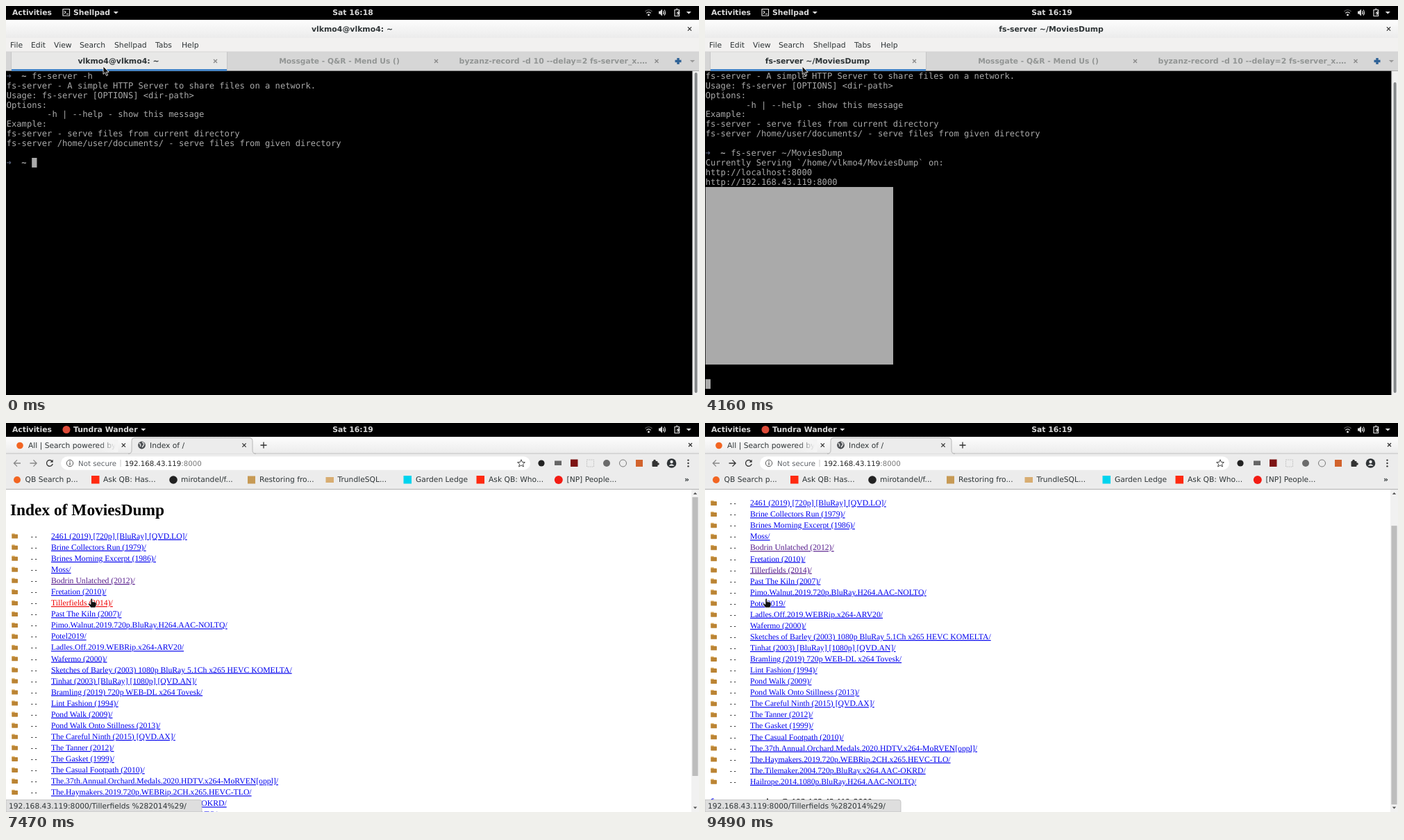
An HTML page for the animation above (9.57 s loop, 998x561 px).

```html
<!DOCTYPE html>
<html lang="en">
<head>
<meta charset="utf-8">
<title>fs-server demo</title>
<style>
html, body { margin: 0; width: 100%; height: 100%; overflow: hidden; background: #000; }
svg { display: block; }
text { white-space: pre; text-rendering: geometricPrecision; font-family: "DejaVu Sans", sans-serif; font-size: 10.7px; fill: #2e3436; }
.b { font-weight: bold; }
.bar { font-weight: bold; fill: #d9d9d9; font-size: 10.8px; }
.mono { font-family: "DejaVu Sans Mono", monospace; font-size: 12.136px; fill: #aaa; }
.url { font-size: 10.23px; fill: #222; }
.link { font-family: "Liberation Serif", serif; font-size: 11.69px; fill: #00e; text-decoration: underline; }
.h1 { font: bold 23.38px "Liberation Serif", serif; fill: #000; }
.h3 { font: italic bold 13.68px "Liberation Serif", serif; fill: #000; }
.dash { font: 9.5px "DejaVu Sans Mono", monospace; fill: #000; }
.line { fill: none; stroke: #333; stroke-width: 1.3; }
</style>
</head>
<body>
<svg id="stage" width="998" height="561" viewBox="0 0 998 561"></svg>
<script>
const LOOP = 9570, ROW = 13.88, CHAR = 7.306, LINE = 16.065;
const COMMAND = 'fs-server ~/MoviesDump/';
const HOST = '192.168.43.119';

const USAGE = [
  'fs-server - A simple HTTP Server to share files on a network.',
  'Usage: fs-server [OPTIONS] &lt;dir-path&gt;',
  'Options:',
  '        -h | --help - show this message',
  'Example:',
  'fs-server - serve files from current directory',
  'fs-server /home/user/documents/ - serve files from given directory'
];

const FOLDERS = [
  '2461 (2019) [720p] [BluRay] [QVD.LO]',
  'Brine Collectors Run (1979)',
  'Brines Morning Excerpt (1986)',
  'Moss',
  'Bodrin Unlatched (2012)',
  'Fretation (2010)',
  'Tillerfields (2014)',
  'Past The Kiln (2007)',
  'Pimo.Walnut.2019.720p.BluRay.H264.AAC-NOLTQ',
  'Potel2019',
  'Ladles.Off.2019.WEBRip.x264-ARV20',
  'Wafermo (2000)',
  'Sketches of Barley (2003) 1080p BluRay 5.1Ch x265 HEVC KOMELTA',
  'Tinhat (2003) [BluRay] [1080p] [QVD.AN]',
  'Bramling (2019) 720p WEB-DL x264 Tovesk',
  'Lint Fashion (1994)',
  'Pond Walk (2009)',
  'Pond Walk Onto Stillness (2013)',
  'The Careful Ninth (2015) [QVD.AX]',
  'The Tanner (2012)',
  'The Gasket (1999)',
  'The Casual Footpath (2010)',
  'The.37th.Annual.Orchard.Medals.2020.HDTV.x264-MoRVEN[oppl]',
  'The.Haymakers.2019.720p.WEBRip.2CH.x265.HEVC-TLO',
  'The.Tilemaker.2004.720p.BluRay.x264.AAC-OKRD',
  'Hailrope.2014.1080p.BluRay.H264.AAC-NOLTQ'
];
const CHOSEN = 6, VISITED = 4;

// markup helpers
const text = (x, y, s, cls = '', more = '') => `<text x="${x}" y="${y}" class="${cls}" ${more}>${s}</text>`;
const mid = (x, y, s, cls, more = '') => text(x, y, s, cls, 'text-anchor="middle" ' + more);
const rect = (x, y, w, h, fill, more = '') => `<rect x="${x}" y="${y}" width="${w}" height="${h}" fill="${fill}" ${more}/>`;
const dot = (x, y, r, fill, more = '') => `<circle cx="${x}" cy="${y}" r="${r}" fill="${fill}" ${more}/>`;
const path = (d, more = 'class="line"') => `<path d="${d}" ${more}/>`;
const group = (id, s, more = '') => `<g id="${id}" ${more}>${s}</g>`;
const cross = (x, y, r, color = '#333', w = 1.3) =>
  path(`M${x - r} ${y - r}l${2 * r} ${2 * r}m0 ${-2 * r}l${-2 * r} ${2 * r}`, `stroke="${color}" stroke-width="${w}" fill="none"`);
const caret = (x, y, fill, r = 3.6) => path(`M${x - r} ${y}h${2 * r}l${-r} ${r}z`, `fill="${fill}"`);
const rowY = i => 104.9 + ROW * i;

const gradient = (id, axis, stops) => `<linearGradient id="${id}" ${axis}>` +
  stops.map(([c, o], i) => `<stop offset="${i}" stop-color="${c}" stop-opacity="${o}"/>`).join('') + '</linearGradient>';

function topBar() {
  const ink = 'fill="none" stroke="#ddd" stroke-width="1.2"';
  return rect(0, 0, 998, 19.7, '#000') +
    text(9, 12.9, 'Activities', 'bar') +
    mid(499.5, 12.9, '', 'bar', 'id="clock"') +
    group('appShell',
      path('M82 4.5h9.5v9.5h-9.5zM84 7l2 2l-2 2M87 11.5h3', ink) +
      text(97, 12.9, 'Shellpad', 'bar') + caret(158.3, 8, '#ddd')) +
    group('appWeb', dot(87, 9.5, 5.5, '#dd4b39') +
      text(97, 12.9, 'Tundra Wander', 'bar') + caret(197.8, 8, '#ddd')) +
    path('M920.5 8a6.5 6.5 0 0 1 10 0', 'fill="none" stroke="#555" stroke-width="1.4"') +
    path('M922.3 10.3a4.3 4.3 0 0 1 6.4 0', ink) + dot(925.5, 12.8, 1.5, '#ddd') +
    path('M940 7.5h2l3-3v10l-3-3h-2z', 'fill="#ddd"') +
    path('M946.5 7q1.6 2.4 0 5M948 5.5q3 4 0 8', ink) +
    path('M963 5.5h6.5v9h-6.5zM965 4h2.5', ink) +
    path('M969 7l-4 3.5h2.5l-1 3.5l4.5-4.5h-2.5z', 'fill="#ddd"') +
    caret(983.3, 8, '#ddd');
}

function shell() {
  const menu = [[6, 'File'], [36, 'Edit'], [69, 'View'], [106, 'Search'], [156, 'Shellpad'], [215, 'Tabs'], [253, 'Help']];
  const prompt = (y, s, id) => text(0.5, y, '➜', 'mono', 'style="fill:#566079"') +
    text(22.3, y, '~', 'mono b') + text(37.2, y, s, 'mono', `id="${id}"`);
  return rect(0, 19.7, 998, 542, '#000') +
    group('lines',
      group('oldPrompt', prompt(rowY(0), 'fs-server -h', 'first')) +
      USAGE.map((s, i) => text(0.7, rowY(i + 1), s, 'mono')).join('') +
      prompt(rowY(9), '', 'typed') +
      group('serving', text(0.7, rowY(10), 'Currently Serving `/home/vlkmo4/MoviesDump` on:', 'mono') +
        text(0.7, rowY(11), 'http://localhost:8000', 'mono')) +
      text(0.7, rowY(12), `http://${HOST}:8000`, 'mono', 'id="address"') +
      rect(0.7, 274.9, 270.3, 256.1, '#aaa', 'id="panel"') +
      rect(0, 219, CHAR, 13.9, '#aaa', 'id="block"')) +
    rect(0, 19.7, 998, 26.8, 'url(#bar)') +
    mid(498.5, 36.6, '', 'b', 'id="title" style="font-size:10.9px"') +
    cross(984.5, 33, 2.6) +
    rect(0, 46, 998, 20, '#f2f1f0') + menu.map(m => text(m[0], 60, m[1], '', 'style="font-size:10.8px"')).join('') +
    rect(0, 66, 998, 27.6, '#d6d6d6') + rect(8, 66, 310, 27.6, '#e8e8e7') +
    rect(8, 91.2, 310, 2.4, '#2a76c6') +
    path('M7.5 66v27M318.5 66v27', 'stroke="#c6c6c6"') + rect(0, 65.6, 998, 0.8, '#cfcfcf') +
    mid(162, 83.3, '', 'b', 'id="tabName" style="font-size:10.9px"') +
    mid(480, 83.3, 'Mossgate - Q&amp;R - Mend Us ()', 'b', 'style="fill:#929594"') +
    mid(788, 83.3, 'byzanz-record -d 10 --delay=2 fs-server_x.…', 'b', 'style="fill:#929594;font-size:10.9px"') +
    [301.5, 619.5, 937].map(x => cross(x, 79.5, 2.5, '#888')).join('') +
    path('M968 75v9M963.5 79.5h9', 'stroke="#2f6296" stroke-width="3.4"') + caret(988.5, 78, '#999') +
    rect(988.6, 93.6, 9.4, 468, '#f1f1f0') + rect(988.6, 93.6, 0.7, 468, '#c8c8c8') +
    rect(991.6, 96, 4, 462, '#85888a', 'rx="2" id="slider"');
}

function entry(name, i, id) {
  const y = 166.8 + LINE * i;
  return rect(8.3, y - 7.5, 4.4, 2.6, '#e0b56c') + rect(8.3, y - 6.2, 8.7, 6, '#bb8433', 'rx=".6"') +
    text(34.5, y, '--', 'dash') +
    text(65, y, name, 'link', `id="${id}"`);
}

function pages() {
  const name = FOLDERS[CHOSEN];
  const endY = 166.8 + LINE * FOLDERS.length;
  const footer = y => text(7, y, `<tspan fill="#00e" text-decoration="underline">fs-server</tspan> running @ ${HOST}:8000`, 'h3');
  return rect(0, 96, 998, 465, '#fff') +
    group('index', text(6, 132.7, 'Index of MoviesDump', 'h1') +
      FOLDERS.map((s, i) => entry(s + '/', i, 'dir' + i)).join('') + footer(endY + 13.7)) +
    group('inner', text(6, 132.7, 'Index of MoviesDump/' + name, 'h1') +
      ['../', 'Tillerfields.2014.720p.mp4', 'Tillerfields.2014.720p.srt'].map((s, i) => entry(s, i, 'file' + i)).join('') +
      footer(230)) +
    group('scroll', rect(987, 96, 11, 465, '#f1f1f1') + rect(988.4, 107, 8.2, 402, '#bdbdbd', 'id="thumb"') +
      path('M989.8 103h5.4l-2.7-3z', 'fill="#555"') + path('M989.8 553.5h5.4l-2.7 3z', 'fill="#555"')) +
    group('status', path('M0 543.5h279q3 0 3 3V561H0z', 'fill="#dedede" stroke="#bbb" stroke-width=".8"') +
      text(4, 556, '', '', 'id="statusText"'));
}

function toolbar() {
  const marks = [
    ['QB Search p...', 27.5, dot(16, 82, 5, '#f26522')],
    ['Ask QB: Has...', 140, rect(123, 76, 11.5, 11.5, '#ff2a10')],
    ['mirotandel/f...', 252, dot(241, 82, 5.8, '#222')],
    ['Restoring fro...', 365, rect(348, 76.5, 11, 11, '#c79a55')],
    ['TrundleSQL...', 477.5, rect(460.5, 78, 11.5, 8, '#d8ad72')],
    ['Garden Ledge', 590, rect(572.5, 76, 11.5, 11.5, '#00d4ee')],
    ['Ask QB: Who...', 695, rect(677.5, 76, 11.5, 11.5, '#ff2a10')],
    ['[NP] People...', 807.5, dot(795.8, 82, 6, '#f31c14')]
  ];
  const arrow = (x, dir, id) => path(`M${x + 5 * dir} 58h${-9.5 * dir}m${4.5 * dir} -4.6l${-4.6 * dir} 4.6l${4.6 * dir} 4.6`, `class="line" id="${id}"`);
  return rect(0, 19.7, 998, 24.8, 'url(#bar)') +
    dot(20, 32.5, 4.8, '#f26522') + text(32, 35.6, 'All | Search powered by') +
    rect(134, 24, 24, 18, 'url(#fade)') + rect(157.5, 24, 4, 18, '#f4f4f4') +
    cross(169.3, 32, 2.6) + cross(985.5, 31.5, 2.5) +
    rect(0, 44, 998, 52, '#ececec') + rect(0, 43.6, 998, 0.8, '#b4b4b4') + rect(0, 95.2, 998, 0.9, '#a9a9a9') +
    path('', 'id="tab" fill="#ececec" stroke="#b0b0b0" stroke-width=".9"') +
    group('tabEnd', cross(-12, 32, 2.6) + path('M16 27.5v9M11.5 32h9', 'class="line"')) +
    group('globe', dot(195.5, 32, 5.4, '#4a4d51') +
      path('M192 29q3 3 1 5M196 28q4 1 2 4l-2 3', 'stroke="#ddd" stroke-width="1.5" fill="none"')) +
    path('M195.5 27a5 5 0 0 1 3 1', 'id="spin" class="line" stroke-width="1.1"') +
    text(207, 35.6, '', '', 'id="pageName"') +
    dot(16, 58, 9.6, '#d0d0d0', 'id="halo"') +
    arrow(16, 1, 'back') + arrow(39.5, -1, 'ahead') +
    group('stop', cross(63, 58, 4)) +
    group('reload', path('M66.4 55.2a4.4 4.4 0 1 0 .8 3.8', 'class="line"') + path('M67.6 52.8v4h-4z', 'fill="#333"')) +
    rect(79, 48.3, 676, 19.4, '#fff', 'rx="9.7"') +
    dot(92, 58, 4.7, 'none', 'stroke="#555"') + rect(91.4, 57.2, 1.3, 3.6, '#555') + rect(91.4, 55, 1.3, 1.3, '#555') +
    group('warn', text(104, 61.8, 'Not secure', 'url', 'style="fill:#5f6368"') + rect(164.6, 53, 0.8, 10, '#bbb')) +
    '<text id="url" y="61.8" class="url"><tspan id="host"></tspan><tspan id="rest" fill="#777"></tspan></text>' +
    path('M742 52.8l1.5 3.6l3.9.3l-3 2.5l1 3.8l-3.4-2.1l-3.4 2.1l1-3.8l-3-2.5l3.9-.3z', 'fill="none" stroke="#444" stroke-width="1"') +
    dot(771, 58, 4.6, '#222') + rect(790, 54.5, 10, 6.5, '#666') + rect(813, 52.5, 10.5, 10.5, '#7d1414') +
    rect(836.5, 53, 10, 10, 'none', 'stroke="#c4c4c4" stroke-dasharray="2 1"') +
    dot(865, 58, 5, '#6b6b6b') + dot(888.5, 58, 5, 'none', 'stroke="#777"') +
    rect(907, 53, 10, 10, '#d2632d') +
    rect(930.5, 55, 8, 8, '#333', 'rx="1"') + dot(934, 54.6, 1.8, '#333') + dot(939, 59, 1.8, '#333') +
    dot(958.5, 58, 6.8, '#2f3336') + dot(958.5, 56, 2.2, '#ececec') + path('M954.3 61.8q4.2-5 8.4 0z', 'fill="#ececec"') +
    [53.6, 58, 62.4].map(y => dot(982.5, y, 1.2, '#333')).join('') +
    marks.map(([s, x, icon]) => icon + text(x, 85.4, s)).join('') +
    text(977, 85, '»', 'b') +
    group('tip', rect(21, 69, 203, 17, '#f7f7f7', 'stroke="#aaa" stroke-width=".8"') +
      text(25, 81, 'Click to go back, hold to see history', '', 'style="font-size:10.2px"'));
}

const stage = document.getElementById('stage');
stage.innerHTML = '<defs>' +
  gradient('bar', 'x2="0" y2="1"', [['#fdfdfd', 1], ['#ebebeb', 1]]) +
  gradient('fade', '', [['#f4f4f4', 0], ['#f4f4f4', 1]]) + '</defs>' +
  group('shell', shell()) + group('web', pages() + toolbar()) + topBar() +
  group('mouse',
    path('M0 0v11.4l2.6-2.4l2 4.6l2-.9l-2-4.4h3.6z', 'id="arrow" fill="#111" stroke="#fff" stroke-width=".8"') +
    path('M-1 .8q1.2-1.6 2.3 0v4q4.5-.3 5.7 1.6v3.6l-1.6 3.2h-6.2l-4-5.2q.4-1.8 2.2-.4l1.6 1z', 'id="hand" fill="#111" stroke="#fff" stroke-width=".6"'));

const el = {};
stage.querySelectorAll('[id]').forEach(e => el[e.id] = e);

// timing tables: [ms, value...]
const TYPED = [[0, 0], [250, 1], [310, 2], [420, 3], [940, 4], [1020, 5], [1110, 6], [1280, 7], [1360, 8], [1440, 9], [1520, 10],
  [1700, 11], [1800, 12], [2400, 11], [2610, 12], [2870, 13], [3110, 14], [3290, 15], [3440, 23], [3800, 22]];
const MOUSE = [[0, 140, 87], [4160, 140, 87], [4500, 186, 160], [4910, 131, 252], [6520, 131, 252], [6760, 127, 234],
  [7010, 123, 253], [7760, 123, 253], [8350, 16, 57], [8850, 16, 57], [9040, 84, 214], [9220, 88, 253]];
const TAB = [[5830, 20], [5880, 44], [6080, 174]];
const SCROLL = [[9320, 0], [9490, 47.6]];

const step = (table, t) => table.reduce((v, s) => t >= s[0] ? s[1] : v, table[0][1]);
function tween(table, t, k = 1) {
  const i = table.findIndex(s => s[0] > t);
  if (i < 0) return table[table.length - 1][k];
  if (!i) return table[0][k];
  const a = table[i - 1], b = table[i];
  return a[k] + (b[k] - a[k]) * (t - a[0]) / (b[0] - a[0]);
}
const within = (t, a, b) => t >= a && t < b;
const show = (id, on) => el[id].style.display = on ? '' : 'none';
const put = (id, s) => { if (el[id].textContent !== s) el[id].textContent = s; };
const set = (id, name, v) => el[id].setAttribute(name, v);

function drawShell(t) {
  const running = t >= 3800, full = t >= 3880;
  const name = running ? 'fs-server ~/MoviesDump' : 'vlkmo4@vlkmo4: ~';
  const n = step(TYPED, t);
  put('title', name);
  put('tabName', name);
  put('typed', COMMAND.slice(0, n));
  show('oldPrompt', !full);
  show('serving', running);
  show('address', t >= 3840);
  show('panel', full);
  set('address', 'text-decoration', t >= 4870 ? 'underline' : 'none');
  set('lines', 'transform', `translate(0 ${full ? -ROW : 0})`);
  set('block', 'x', running ? 0.7 : 37.2 + n * CHAR);
  set('block', 'y', 219 + ROW * (full ? 24 : t >= 3840 ? 4 : running ? 3 : 0));
  show('block', !within(t, 4300, 4900) && t < 5640);
  set('slider', 'y', full ? 110 : 96);
  set('slider', 'height', full ? 448 : 462);
}

function drawWeb(t) {
  const loaded = t >= 6080, inner = within(t, 7680, 8870);
  const busy = !loaded || within(t, 7520, 7680) || within(t, 8830, 9110);
  const end = 181 + tween(TAB, t), scroll = tween(SCROLL, t);
  const peek = within(t, 6680, 6860);
  const slug = s => s.replace('(', '%28').replace(')', '%29') + '/';

  set('tab', 'd', `M176 44.4q5 0 5-5v-14q0-4 4-4H${end - 4}q4 0 4 4v14q0 5 5 5`);
  set('tabEnd', 'transform', `translate(${end} 0)`);
  put('pageName', !loaded ? '' : inner ? 'Index of /Tillerfields' : 'Index of /');
  show('globe', loaded && !busy);
  show('spin', loaded && busy);
  set('spin', 'transform', `rotate(${(t - 9040) * 0.36} 195.5 32)`);
  show('stop', busy);
  show('reload', !busy);
  show('warn', loaded);
  set('url', 'x', loaded ? 171 : 104);
  put('host', HOST);
  put('rest', ':8000' + (inner ? '/Tillerfields%20%282014%29/' : ''));
  set('back', 'style', `stroke:${inner ? '#333' : '#888'}`);
  set('ahead', 'style', `stroke:${t >= 8870 ? '#333' : '#888'}`);
  show('halo', within(t, 8350, 9110));
  show('tip', within(t, 8450, 8830));
  el.tip.style.opacity = t < 8490 ? 0.5 : 1;

  show('index', loaded && !inner);
  show('inner', inner);
  show('scroll', loaded && !inner);
  set('index', 'transform', `translate(0 ${-scroll})`);
  set('thumb', 'y', 107 + scroll * 0.865);
  el['dir' + VISITED].style.fill = '#551a8b';
  el['dir' + CHOSEN].style.fill = within(t, 7470, 7600) ? '#e00' : t >= 7600 ? '#551a8b' : '';
  show('status', within(t, 6250, 7680) || t >= 9260);
  put('statusText', HOST + ':8000/' + slug(FOLDERS[peek ? CHOSEN - 1 : CHOSEN]));
}

function draw(t) {
  const web = t >= 5830;
  const hand = within(t, 6230, 7700) || t >= 9030;
  put('clock', t < 3200 ? 'Sat 16:18' : 'Sat 16:19');
  show('shell', !web);
  show('appShell', !web);
  show('web', web);
  show('appWeb', web);
  if (web) drawWeb(t); else drawShell(t);
  set('mouse', 'transform', `translate(${tween(MOUSE, t)} ${tween(MOUSE, t, 2)})`);
  show('arrow', !hand);
  show('hand', hand);
}

const start = performance.now();
function tick() {
  draw((performance.now() - start) % LOOP);
  requestAnimationFrame(tick);
}
tick();
</script>
</body>
</html>
```
